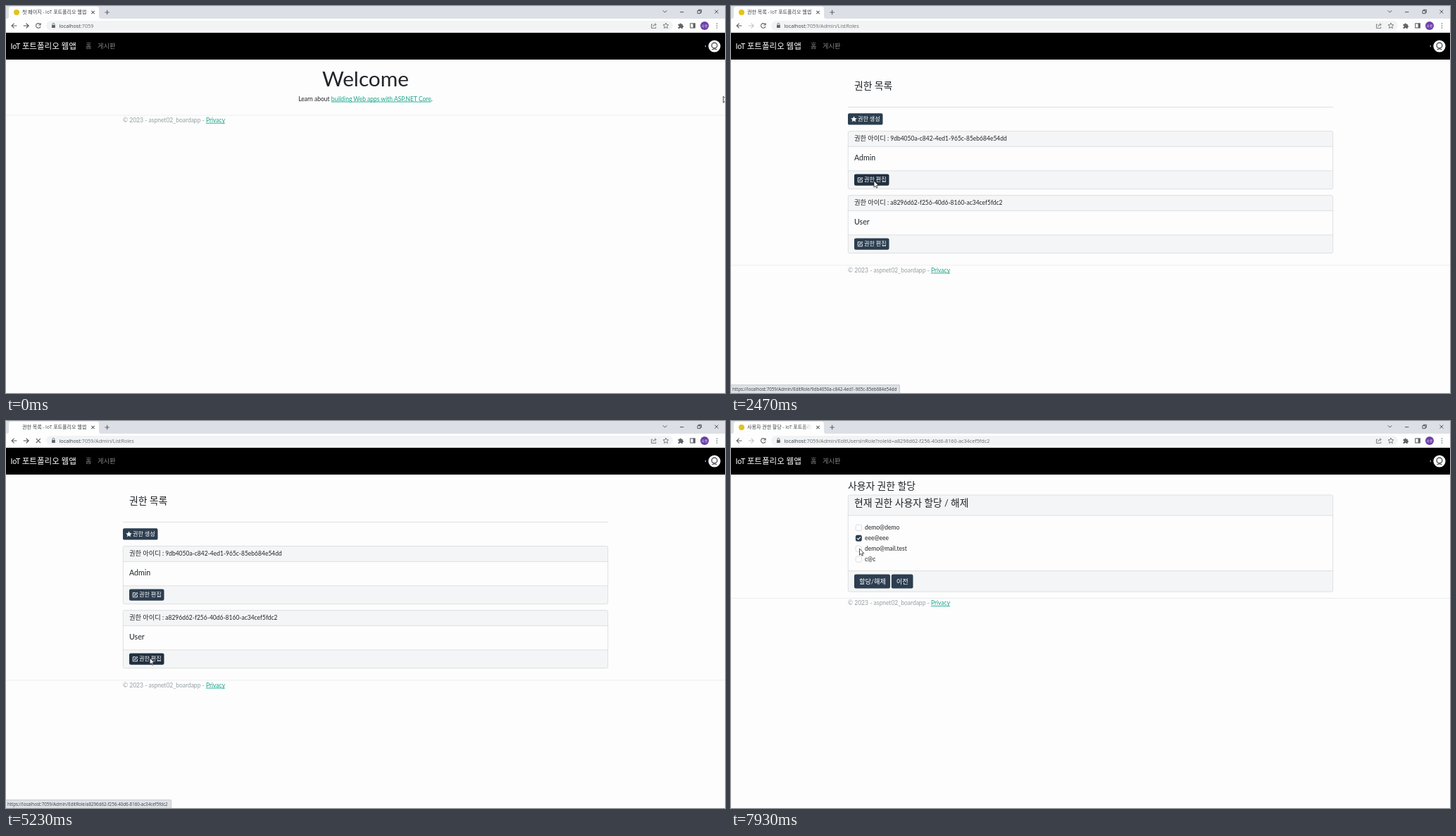
Write an HTML page that moves like this. It is 1021x549 px and loops after 8000 ms.

```html
<!DOCTYPE html>
<html lang="ko">
<head>
<meta charset="utf-8">
<title>Role admin demo</title>
<style>
html, body { margin: 0; width: 100%; height: 100%; overflow: hidden; background: #fdfdfd; }
svg { position: absolute; left: 0; top: 0; display: block; }
text { font-family: Lato, "Noto Sans CJK KR", sans-serif; white-space: pre; }
.k { font-family: "Noto Sans CJK KR", "Noto Sans CJK", sans-serif; font-size: 1.087em; }
.ui, #status { font-family: "Open Sans", "Noto Sans CJK KR", sans-serif; }
.line { fill: none; stroke: #5f6368; stroke-width: 1.1; }
.page { display: none; }
.btn > rect { fill: #2c3e50; }
.btn.hover > rect { fill: #213040; }
.btn .ico { fill: none; stroke: #fff; stroke-width: .9; }
#status {
  position: absolute; left: 0; bottom: 0; height: 11px; padding: 0 4px 0 2px;
  font-size: 6.2px; line-height: 12px; white-space: nowrap; color: #3c4043;
  background: #dee1e6; border: solid #c6c9ce; border-width: .5px .5px 0 0; border-radius: 0 2px 0 0;
}
</style>
</head>
<body>
<svg id="stage" width="1021" height="549" viewBox="0 0 1021 549"></svg>
<div id="status"></div>
<svg width="1021" height="549"><path id="cursor" d="M0 0V9.2L2.1 7.2L3.5 10.2L5 9.5L3.6 6.7H6.4Z" fill="#fff" stroke="#26282e" stroke-width=".8"/></svg>
<script>
const $ = id => document.getElementById(id);
const LOOP = 8000, REM = 8.51, H4 = 12.77;
const IDS = ['9db4050a-c842-4ed1-965c-85eb684e54dd', 'a8296d62-f256-40d6-8160-ac34cef5fdc2'];
const ROLES = ['Admin', 'User'];
const MEMBERS = ['demo@demo', 'eee@eee'];
const ACCOUNTS = [...MEMBERS, 'demo@mail.test', 'c@c'];

const hangul = s => s.replace(/[가-힣]+/g, '<tspan class="k">$&</tspan>');
const text = (x, y, s, size = REM, fill = '#212529', attr = '') =>
  `<text x="${x}" y="${y}" font-size="${size}" fill="${fill}" ${attr}>${hangul(s)}</text>`;
const rect = (x, y, w, h, fill, attr = '') =>
  `<rect x="${x}" y="${y}" width="${w}" height="${h}" fill="${fill}" ${attr}/>`;
const rule = (x1, x2, y, color) => rect(x1, y - .3, x2 - x1, .7, color);
const path = (d, attr = 'class="line"') => `<path d="${d}" ${attr}/>`;

const ICONS = {
  check: '<circle cx="3.8" cy="3.8" r="3.5"/><path d="M2 3.8L3.4 5.2L5.8 2.4"/>',
  list: '<path d="M2.4 1.4H7.4M2.4 3.8H7.4M2.4 6.2H7.4M.2 1.4H1.2M.2 3.8H1.2M.2 6.2H1.2"/>',
  star: '<path fill="#fff" stroke-width=".4" d="M3.8 .2L4.9 2.7L7.6 3L5.6 4.8L6.2 7.4L3.8 6L1.4 7.4L2 4.8L0 3L2.7 2.7Z"/>',
  edit: '<path d="M4.2 .9H.6V7H6.7V3.8M2.6 5L3 3.6L6.2 .4L7.2 1.4L4 4.6Z"/>'
};

function button(x, y, w, label, icon, h = 16.4, size = 7.45) {
  const pad = h > 18 ? 7 : 5;
  const tx = x + pad + (icon ? 9 : 0);
  return `<g class="btn" data-box="${x},${y},${w},${h}">` + rect(x, y, w, h, '', 'rx="2.2"') +
    (icon ? `<g class="ico" transform="translate(${x + pad - .3} ${y + 4.4})">${ICONS[icon]}</g>` : '') +
    text(tx, y + h / 2 + size * .36, label, size, '#fff') + '</g>';
}

// A bordered card with shaded header and footer
function card(top, head, foot, bottom) {
  const shade = '#f4f5f6', edge = '#d3d5d7';
  return rect(166.3, top, 688.4, bottom - top, shade, 'rx="2.2"') +
    rect(166.3, head, 688.4, foot - head, '#fdfdfd') +
    rule(166, 855, head, edge) + rule(166, 855, foot, edge) +
    rect(166.3, top, 688.4, bottom - top, 'none', `rx="2.2" stroke="${edge}" stroke-width=".7"`);
}

const footer = y => rule(0, 1021, y, '#e4e6e8') +
  text(166, y + 9.8, '© 2023 - aspnet02_boardapp - <tspan fill="#18a588" text-decoration="underline">Privacy</tspan>', REM, '#95a0a2');
const heading = s => text(175, 118, s, H4) + rule(166, 855, 143.2, '#cfd1cf');

const homePage = () =>
  text(510.5, 114, 'Welcome', 29.8, '#212529', 'text-anchor="middle"') +
  text(510.5, 134.6, 'Learn about <tspan fill="#18a588" text-decoration="underline">building Web apps with ASP.NET Core</tspan>.',
    REM, '#212529', 'text-anchor="middle"') + footer(155);

const listPage = () => heading('권한 목록') + button(166, 152.2, 49.5, '권한 생성', 'star') +
  ROLES.map((role, i) => {
    const y = 177.6 + 91 * i;
    return card(y, y + 21.6, y + 56.2, y + 82) +
      text(175, y + 13.8, '권한 아이디 : ' + IDS[i]) +
      text(175, y + 41.2, role, 10.64) +
      button(175, y + 60.8, 49.5, '권한 편집', 'edit');
  }).join('') + footer(367.8);

function editPage(i) {
  const field = (y, label, value, fill) => text(166, y + 13, label) +
    rect(283, y, 571.7, 20, fill, 'rx="2.2" stroke="#ccd2d8" stroke-width=".7"') + text(290, y + 13, value);
  return heading('권한 편집') +
    field(152.4, '권한아이디', IDS[i], '#e9eeef') + field(172.4, '권한이름', ROLES[i], '#fefefe') +
    card(217.7, 246.5, 285.5, 311) +
    button(166, 201.2, 49.5, '권한 갱신', 'check') + button(217.6, 201.2, 49.5, '권한 목록', 'list') +
    text(175, 234.2, '권한 부여 받은 사용자', H4) + text(175, 270, MEMBERS[i], 10.64) +
    button(175, 290, 85, '현재 권한\u00a0 (할당 / 삭제)') + footer(328.5);
}

const usersPage = () => text(166, 96.5, '사용자 권한 할당', H4) + card(105, 134, 212.6, 242.2) +
  text(175, 121.4, '현재 권한 사용자 할당 / 해제', H4) +
  ACCOUNTS.map((name, i) => {
    const y = 151.4 + 14.9 * i, on = i === 1;
    return rect(177.2, y - 4.2, 8.3, 8.3, on ? '#2c3e50' : '#fff', `rx="2" stroke="${on ? '#2c3e50' : '#c4c6c8'}" stroke-width=".6"`) +
      (on ? path(`M179 ${y}l1.7 1.7l3.2 -3.4`, 'fill="none" stroke="#fff" stroke-width="1.2"') : '') +
      text(190, y + 2.8, name);
  }).join('') +
  button(175, 217.5, 51, '할당/해제', '', 20, REM) + button(227.8, 217.5, 30.7, '이전', '', 20, REM) + footer(251.4);

const arrow = (x, dir, id) => path(`M${x - 3.8 * dir} 28H${x + 3.6 * dir}M${x} 24.6L${x + 3.6 * dir} 28L${x} 31.4`, `class="line" id="${id}"`);

const browser = () =>
  rect(0, 0, 1021, 18, '#dce0e6') + rect(0, 18, 1021, 20, '#fefefe') +
  path('M1 18Q4 18 4 14.5V4Q4 .8 7.5 .8H128.5Q132 .8 132 4V14.5Q132 18 135 18Z', 'fill="#fefefe"') +
  '<circle id="favicon" cx="15" cy="9" r="4" fill="#e3c31c"/>' +
  '<svg x="0" y="0" width="116.5" height="18"><text id="title" class="ui" x="23" y="11.3" font-size="6.5" fill="#3c4043"/></svg>' +
  rect(100, 2, 17, 14, 'url(#fade)', 'id="tabFade"') +
  path('M121.3 6.8l4.4 4.4m0 -4.4l-4.4 4.4M140.4 9h6.4m-3.2 -3.2v6.4') +
  path('M932.8 6.3l2.8 2.8l2.8 -2.8M957 8.6h5.4M982 6.6h4v4h-4zM983.4 6.6v-1.3h4v4h-1.4M1006.4 5.6l5 5m0 -5l-5 5', 'class="line" style="stroke:#44474c;stroke-width:.9"') +
  '<circle id="backHover" cx="11.6" cy="28" r="7.8" fill="#d9dbde"/>' +
  arrow(11.6, -1, 'back') + arrow(28.6, 1, 'forward') +
  path('M48.5 25.9A3.3 3.3 0 1 0 49 29M49.1 24.2V27H46.3', 'class="line" id="reload"') +
  path('M42.8 24.8l6.2 6.2m0 -6.2l-6.2 6.2', 'class="line" id="stop"') +
  rect(57, 21, 890, 13.4, '#f1f3f4', 'rx="6.7"') +
  rect(65, 27, 4.8, 3.9, '#5f6368', 'rx=".5"') + path('M66 27v-1.3a1.4 1.4 0 0 1 2.8 0v1.3', 'class="line" style="stroke-width:.8"') +
  '<text id="url" class="ui" x="75.5" y="30.5" font-size="7.25" fill="#6a6e73"/>' +
  path('M918.2 26h-1.6v5.4h6.2v-1.8M918.6 29.3q.4 -3 4 -3M921.2 24.5l2.2 1.8l-2.2 1.9', 'class="line" style="stroke-width:.8"') +
  path('M937 24l1.1 2.6l2.8 .2l-2.1 1.9l.6 2.8l-2.4 -1.5l-2.4 1.5l.6 -2.8l-2.1 -1.9l2.8 -.2z', 'class="line" style="stroke-width:.8"') +
  path('M954.5 25.7h2a1.2 1.2 0 0 1 2.4 0h2v2a1.2 1.2 0 0 1 0 2.4v2h-2a1.2 1.2 0 0 0 -2.4 0h-2v-2a1.2 1.2 0 0 0 0 -2.4z', 'fill="#5f6368"') +
  rect(971.8, 24.8, 6.6, 6.2, 'none', 'class="line"') + rect(975.6, 24.8, 2.8, 6.2, '#5f6368') +
  '<circle cx="992" cy="28" r="6" fill="#6b3fa8"/>' + text(992, 29.8, '사용', 4.4, '#e6dcf3', 'text-anchor="middle"') +
  [25, 28, 31].map(y => `<circle cx="1009.5" cy="${y}" r=".8" fill="#5f6368"/>`).join('') +
  rule(0, 1021, 37.6, '#dfe1e4') + rect(0, 38, 1021, 38, '#000') +
  text(6.5, 60.8, 'IoT 포트폴리오 웹앱', 10.64, '#fff') +
  text(113, 60, '홈', REM, '#858585') + text(130, 60, '게시판', REM, '#858585') +
  path('M994 55.3v3.4l-1.9 -1.7z', 'fill="#999"') + '<circle cx="1006" cy="57" r="8.6" fill="#fff"/>' +
  '<circle cx="1006" cy="56" r="3.9" fill="none" stroke="#333943" stroke-width="1.2"/>' +
  path('M1002.4 62q3.6 -2.4 7.2 0', 'fill="none" stroke="#333943"');

const pages = { home: homePage(), list: listPage(), edit0: editPage(0), edit1: editPage(1), users: usersPage() };
$('stage').innerHTML =
  '<defs><linearGradient id="fade"><stop stop-color="#fefefe" stop-opacity="0"/><stop offset=".9" stop-color="#fefefe"/></linearGradient></defs>' +
  rect(0, 0, 1021, 549, '#fdfdfd') + browser() +
  Object.entries(pages).map(([id, body]) => `<g class="page" id="${id}">${body}</g>`).join('');

const HOST = 'localhost:7059', LIST = '/Admin/ListRoles';
const EDIT = IDS.map(id => '/Admin/EditRole/' + id);
const USERS = '/Admin/EditUsersInRole?roleId=' + IDS[1];

// start, page, address, tab title, can go forward, loading, tab icon radius
const SCENES = [
  [0, 'home', '', '첫 페이지', 1, 0, 4],
  [1480, 'home', '', '첫 페이지', 1, 1, 0],
  [1700, 'list', LIST, '권한 목록', 0, 0, 4],
  [2600, 'list', LIST, '권한 목록', 0, 1, 0],
  [2800, 'edit0', EDIT[0], '권한 편집', 0, 0, 4],
  [4300, 'list', LIST, '권한 목록', 1, 1, 2.5],
  [4480, 'list', LIST, '권한 목록', 1, 0, 4],
  [5130, 'list', LIST, '권한 목록', 1, 1, 0],
  [5330, 'edit1', EDIT[1], '권한 편집', 0, 0, 4],
  [6830, 'edit1', USERS, '', 0, 1, 0],
  [7250, 'users', USERS, '사용자 권한 할당', 0, 0, 4]
];
// from, to, hovered link
const LINKS = [[1250, 1700, LIST], [2320, 2800, EDIT[0]], [4960, 5330, EDIT[1]], [6330, 7250, USERS]];
// time, x, y of the pointer tip
const MOVES = [
  [0, 1018.5, 128], [150, 1018.5, 128], [600, 1004, 60], [850, 1004, 60],
  [1250, 949.5, 80], [1700, 949.5, 80], [2350, 203, 248], [2650, 203, 248],
  [3150, 228, 279], [3300, 228, 279], [3420, 228, 288], [4080, 10.5, 31], [4450, 10.5, 31],
  [4970, 204, 337], [5200, 204, 337], [5650, 218.5, 273], [5950, 218.5, 273],
  [6400, 236, 303.5], [7180, 236, 303.5], [7640, 185, 183], [7780, 179, 176], [7930, 182.5, 181]
];

function pointer(t) {
  const i = MOVES.findIndex(m => m[0] > t);
  if (i < 0) return MOVES.at(-1).slice(1);
  const [t0, x0, y0] = MOVES[i - 1], [t1, x1, y1] = MOVES[i];
  const u = (t - t0) / (t1 - t0), e = u * u * (3 - 2 * u);
  return [x0 + (x1 - x0) * e, y0 + (y1 - y0) * e];
}

const show = (id, on) => $(id).style.display = on ? 'inline' : 'none';
let current;

function setScene(scene) {
  const [, page, address, title, forward, loading, radius] = scene;
  for (const id in pages) show(id, id === page);
  $('url').innerHTML = `<tspan fill="#3c4043">localhost</tspan>:7059${address}`;
  $('title').innerHTML = hangul(title ? title + ' - IoT 포트폴리오 웹앱' : 'https://' + HOST + address);
  show('tabFade', $('title').getComputedTextLength() > 97);
  $('forward').style.stroke = forward ? '#4a4d52' : '#c3c6ca';
  $('favicon').setAttribute('r', radius);
  show('stop', loading);
  show('reload', !loading);
  current = scene;
}

function draw(now) {
  const t = now % LOOP;
  const scene = SCENES.findLast(s => s[0] <= t);
  if (scene !== current) setScene(scene);
  const [x, y] = pointer(t);
  $('cursor').setAttribute('transform', `translate(${x} ${y})`);
  show('backHover', Math.hypot(x - 11.6, y - 28) < 8);
  for (const b of document.querySelectorAll(`#${scene[1]} .btn`)) {
    const [bx, by, w, h] = b.dataset.box.split(',').map(Number);
    b.classList.toggle('hover', x >= bx && x <= bx + w && y >= by && y <= by + h);
  }
  const link = LINKS.find(l => t >= l[0] && t < l[1]);
  $('status').style.display = link ? 'block' : 'none';
  if (link) $('status').textContent = 'https://' + HOST + link[2];
}

const start = performance.now();
function tick() {
  draw(performance.now() - start);
  requestAnimationFrame(tick);
}
tick();
</script>
</body>
</html>
```
